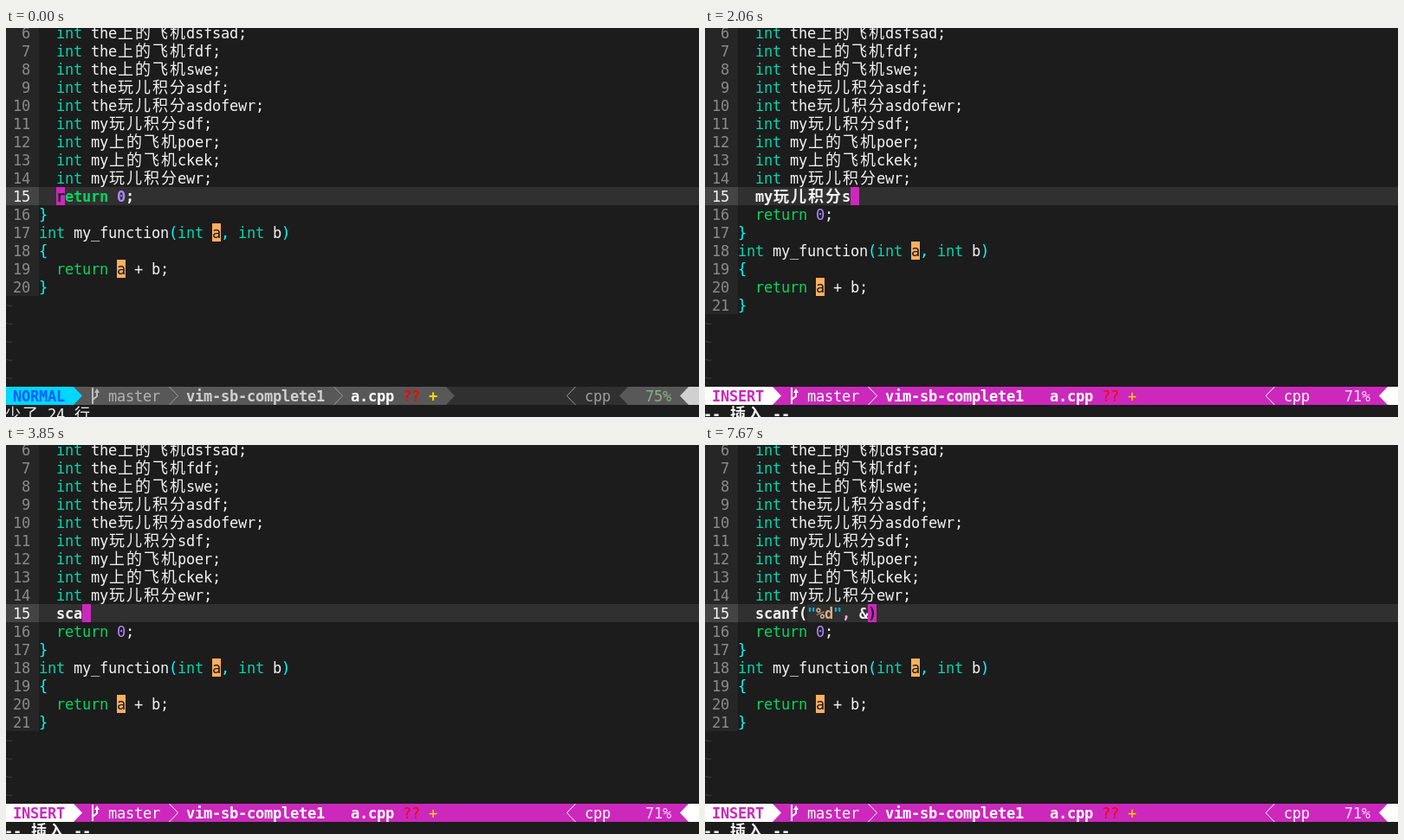
An HTML page with a canvas for the animation above (8 s loop, 800 by 450 pixels).

```html
<!DOCTYPE html>
<html lang="zh-CN">
<head>
<meta charset="utf-8">
<title>Editor completion</title>
<style>
html, body { margin: 0; width: 100%; height: 100%; overflow: hidden; background: #1c1c1c; }
canvas { display: block; }
</style>
</head>
<body>
<canvas id="stage" width="800" height="450"></canvas>
<script>
const ctx = document.getElementById('stage').getContext('2d');
const LOOP = 8000, CELL = 10, ROW = 21, BASE = 17, LEFT = -2, CODE = 38, BAR = 415;
const LATIN = '17px "DejaVu Sans Mono", monospace';
const HAN = '18px "Noto Sans CJK SC", "Noto Sans CJK", sans-serif';
const C = {
  bg: '#1c1c1c', gutter: '#262626', line: '#303030', current: '#444444', number: '#8a8a8a',
  fg: '#f2f2f2', type: '#00d7af', keyword: '#00d75f', digit: '#af87ff', pair: '#00ffff',
  inner: '#ffafff', quote: '#00afd7', string: '#d7af87', word: '#ffaf5f',
  accent: '#cc28bc', tilde: '#343434', white: '#ffffff'
};

const head = [
  'int the上的飞机dsfsad;', 'int the上的飞机fdf;', 'int the上的飞机swe;',
  'int the玩儿积分asdf;', 'int the玩儿积分asdofewr;', 'int my玩儿积分sdf;',
  'int my上的飞机poer;', 'int my上的飞机ckek;', 'int my玩儿积分ewr;'
].map(s => '  ' + s);
const tail = ['  return 0;', '}', 'int my_function(int a, int b)', '{', '  return a + b;', '}'];

// time, typed text (null: no extra line), cells the cursor sits before the end, options
const steps = [
  [0, null, 0, { normal: true }],
  [90, ''], [360, 's'], [640, 'sf'],
  [900, 'the上的飞机dsfsad', 0, { flash: true }], [940, 'the上的飞机dsfsad'],
  [1570, 'my玩儿积分sdf', 0, { flash: true }], [1620, 'my玩儿积分sdf'],
  [2060, 'my玩儿积分s'], [2100, 'my玩儿积分'], [2140, 'my玩儿'],
  [2180, 'my玩'], [2220, 'm'], [2260, ''], [2300, null],
  [3120, ''], [3480, 's'], [3760, 'sc'], [3850, 'sca'], [3980, 'scan'], [4020, 'scanf'],
  [4440, 'scanf(', 0, { broken: true }], [4500, 'scanf()', 1], [4680, 'scanf()', 1, { match: true }],
  [5090, 'scanf(")', 1, { broken: true }], [5240, 'scanf("")', 1, { match: true }], [5280, 'scanf("")', 2],
  [5680, 'scanf("%")', 2], [5760, 'scanf("%d")', 2], [6150, 'scanf("%d")', 1, { match: true }],
  [6650, 'scanf("%d",)', 1, { match: true }], [6770, 'scanf("%d", )', 1, { match: true }],
  [7670, 'scanf("%d", &)', 1, { match: true }]
];

const isHan = ch => ch > '\u2e80';
const cells = ch => isHan(ch) ? 2 : 1;
const width = s => [...s].reduce((n, ch) => n + cells(ch), 0);
const rowY = n => 184 + (n - 15) * ROW;

function rect(x, y, w, h, color) {
  ctx.fillStyle = color;
  ctx.fillRect(x, y, w, h);
}

function text(s, x, y, color, bold) {
  ctx.fillStyle = color;
  for (const ch of s) {
    const han = isHan(ch);
    ctx.font = (bold ? 'bold ' : '') + (han ? HAN : LATIN);
    ctx.fillText(ch, han ? x + 1 : x, y + BASE);
    x += cells(ch) * CELL;
  }
  return x;
}

function poly(points, color, stroke) {
  ctx.beginPath();
  points.forEach(([x, y]) => ctx.lineTo(x, y));
  if (stroke) {
    ctx.strokeStyle = color;
    ctx.lineWidth = stroke;
    ctx.stroke();
  } else {
    ctx.fillStyle = color;
    ctx.fill();
  }
}

// dir 1 points right, -1 points left; x is the flat side
function arrow(x, dir, color, stroke) {
  poly([[x, BAR], [x + dir * CELL, BAR + ROW / 2], [x, BAR + ROW]], color, stroke);
}

function tokenColor(token, typing, broken) {
  if (token === 'int') return C.type;
  if (token === 'return') return C.keyword;
  if (/^\d$/.test(token)) return C.digit;
  if (/^[(){},]$/.test(token)) return typing ? C.inner : broken ? C.fg : C.pair;
  return C.fg;
}

function codeLine(s, y, bold, typing, opt) {
  let x = CODE, quoted = false;
  for (const token of s.match(/[A-Za-z_]+|./gu)) {
    if (token === '"') {
      quoted = !quoted;
      x = text(token, x, y, C.quote, bold);
    } else if (quoted) {
      x = text(token, x, y, C.string, bold);
    } else if (token === 'a') {
      rect(x, y, CELL, ROW, C.word);
      x = text(token, x, y, C.bg, bold);
    } else if (token === '(' && opt.match && typing) {
      rect(x, y, CELL, ROW, C.gutter);
      x = text(token, x, y, C.fg, bold);
    } else {
      x = text(token, x, y, tokenColor(token, typing, opt.broken), bold);
    }
  }
}

function branchIcon(color) {
  poly([[100, BAR + 1], [100, BAR + 20]], color, 2);
  poly([[100, BAR + 15], [105, BAR + 11], [105, BAR + 6]], color, 2);
  poly([[102, BAR + 7], [105, BAR + 2], [108, BAR + 7]], color);
}

function statusBar(normal, percent, corner) {
  const band = normal ? '#585858' : C.accent;
  const thin = normal ? '#9e9e9e' : C.white;
  const mode = normal ? '#00d7ff' : C.white;
  rect(0, BAR, 800, ROW, normal ? '#303030' : C.accent);
  rect(78, BAR, 430, ROW, band);
  arrow(508, 1, band);
  rect(718, BAR, 82, ROW, band);
  arrow(718, -1, band);
  rect(0, BAR, 78, ROW, mode);
  arrow(78, 1, mode);
  rect(788, BAR, 12, ROW, corner);
  arrow(788, -1, corner);

  text(normal ? 'NORMAL' : 'INSERT', 8, BAR, normal ? '#005fff' : C.accent, true);
  branchIcon(normal ? '#bcbcbc' : C.white);
  text('master', 118, BAR, normal ? '#b2b2b2' : C.white);
  arrow(188.5, 1, thin, 1);
  text('vim-sb-complete1', 208, BAR, normal ? '#d0d0d0' : C.white, true);
  if (normal) arrow(378.5, 1, thin, 1);
  text('a.cpp', 398, BAR, C.white, true);
  text('??', 458, BAR, '#ff0000', normal);
  text('+', 488, BAR, '#ffd700', normal);
  arrow(657.5, -1, thin, 1);
  text('cpp', 668, BAR, normal ? '#9e9e9e' : C.white);
  text(percent + '%', 738, BAR, normal ? '#87af87' : '#ffd7ff');
}

function draw([, typed, back = 0, opt = {}]) {
  const open = typed !== null;
  const lines = open ? [...head, '  ' + typed, ...tail] : [...head, ...tail];
  const active = open || opt.normal ? 15 : 14;
  const y = rowY(active), line = lines[active - 6];
  const last = 5 + lines.length;

  rect(0, 0, 800, 450, C.bg);
  rect(0, 0, CODE, rowY(last + 1), C.gutter);
  rect(CODE, y, 800 - CODE, ROW, C.line);
  rect(0, y, CODE, ROW, C.current);

  lines.forEach((s, i) => {
    const n = i + 6, on = n === active;
    text(String(n).padStart(2), 8, rowY(n), on ? C.fg : C.number);
    codeLine(s, rowY(n), on, on && open, opt);
  });
  for (let n = last + 1; rowY(n) < BAR; n++) text('~', LEFT, rowY(n), C.tilde);

  const col = opt.normal ? 2 : width(line) - back;
  const x = CODE + col * CELL;
  rect(x, y, CELL, ROW, C.accent);
  const under = opt.normal ? 'r' : back ? line[line.length - back] : '';
  text(under, x, y, C.bg, true);

  const plain = opt.normal || opt.flash;
  statusBar(plain, opt.normal ? 75 : open ? 71 : 70, opt.normal ? '#d0d0d0' : C.white);
  if (opt.normal) text('少了 24 行', LEFT, 436, C.fg);
  else if (!opt.flash) text('-- 插入 --', LEFT, 436, C.fg, true);
}

const start = performance.now();
function tick() {
  const t = (performance.now() - start) % LOOP;
  draw(steps.findLast(s => s[0] <= t) || steps[0]);
  requestAnimationFrame(tick);
}
tick();
</script>
</body>
</html>
```
